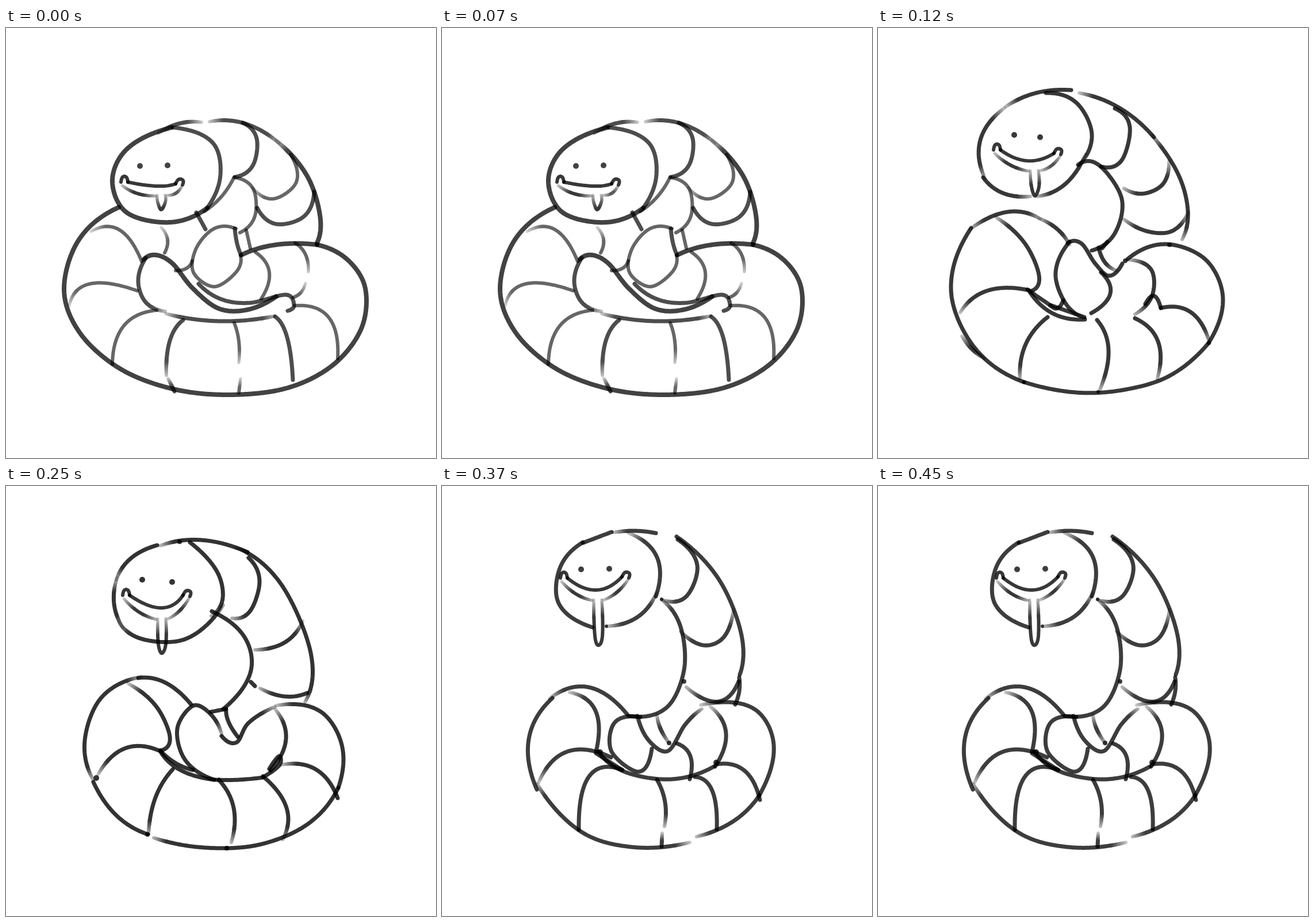
Recreate the animation shown at these times as an HTML page with a canvas. Size 748 px wide and 748 px high, loop 0.5 s.

```html
<!DOCTYPE html>
<html lang="en">
<head>
<meta charset="utf-8">
<title>Coiled worm</title>
<style>
html, body { margin: 0; width: 100%; height: 100%; overflow: hidden; background: #fff; }
canvas { display: block; }
</style>
</head>
<body>
<canvas id="stage" width="748" height="748"></canvas>
<script>
const SIZE = 748;
const LOOP = 500;
const FADE = 26;

function makeLayer() {
  const layer = document.createElement('canvas');
  layer.width = layer.height = SIZE;
  return layer.getContext('2d');
}

function clear(ctx) {
  ctx.globalCompositeOperation = 'source-over';
  ctx.fillStyle = '#fff';
  ctx.fillRect(0, 0, SIZE, SIZE);
}

const brush = makeLayer();
let page, weight, dark;

function nib(w, d) {
  weight = w;
  dark = d;
}

function mix(a, b, c, d, t) {
  return (2 * b + (c - a) * t + (2 * a - 5 * b + 4 * c - d) * t * t +
    (3 * b - a - 3 * c + d) * t * t * t) / 2;
}

// Point that continues the curve before its first point p.
function extend(p, q, r) {
  return [0, 1].map(n => r ? 3 * p[n] - 3 * q[n] + r[n] : 2 * p[n] - q[n]);
}

function spline(pts) {
  const tail = [...pts].reverse();
  const all = [extend(...pts), ...pts, extend(...tail)];
  const out = [];
  for (let i = 1; i < all.length - 2; i++) {
    const [a, b, c, d] = all.slice(i - 1, i + 3);
    const steps = Math.ceil(Math.hypot(c[0] - b[0], c[1] - b[1]) / 3);
    for (let k = 0; k < steps; k++) {
      out.push([0, 1].map(n => mix(a[n], b[n], c[n], d[n], k / steps)));
    }
  }
  out.push(pts[pts.length - 1]);
  return out;
}

// Pale ends and a dark middle; strokes multiply where they cross.
function stroke(fadeStart, fadeEnd, coords) {
  const pts = [];
  for (let i = 0; i < coords.length; i += 2) pts.push([coords[i], coords[i + 1]]);
  const curve = spline(pts);
  const last = curve.length - 1;
  const reach = Math.min(FADE / 3, last * 0.6);
  const ink = i => {
    const a = fadeStart ? Math.min(1, 0.3 + 0.7 * i / reach) : 1;
    const b = fadeEnd ? Math.min(1, 0.3 + 0.7 * (last - i) / reach) : 1;
    return Math.min(a, b);
  };
  clear(brush);
  brush.globalCompositeOperation = 'darken';
  brush.lineCap = brush.lineJoin = 'round';
  for (let i = 0; i < last;) {
    const level = ink(i);
    const grey = Math.round(255 * (1 - dark * level));
    brush.strokeStyle = `rgb(${grey},${grey},${grey})`;
    brush.lineWidth = weight * (0.75 + 0.25 * level);
    brush.beginPath();
    brush.moveTo(...curve[i]);
    do brush.lineTo(...curve[++i]);
    while (i < last && ink(i) === level);
    brush.stroke();
  }
  page.globalCompositeOperation = 'multiply';
  page.drawImage(brush.canvas, 0, 0);
}

const solid = (...xy) => stroke(false, false, xy);
const fadeIn = (...xy) => stroke(true, false, xy);
const fadeOut = (...xy) => stroke(false, true, xy);
const fadeBoth = (...xy) => stroke(true, true, xy);

function dot(r, x, y) {
  const grey = Math.round(255 * (1 - dark));
  page.globalCompositeOperation = 'multiply';
  page.fillStyle = `rgb(${grey},${grey},${grey})`;
  page.beginPath();
  page.arc(x, y, r, 0, Math.PI * 2);
  page.fill();
}

// Eyes, mouth corners, lowest point of the smile, tongue root and tip.
function face({ eyes, left: [lx, ly], right: [rx, ry], dip, root: [x, y], tip: [tx, ty] }) {
  for (const [ex, ey] of eyes) dot(5, ex, ey);
  nib(6, 0.78);
  solid(lx - 3, ly + 9, lx, ly, lx + 6, ly, lx + 9, ly + 9);
  solid(lx + 9, ly + 9, ...dip, rx - 9, ry + 8);
  solid(rx - 9, ry + 8, rx - 3, ry, rx + 4, ry + 2, rx + 3, ry + 10);
  fadeBoth(lx - 1, ly + 15, (lx + x) / 2 - 7, (ly + y) / 2 + 13, x - 9, y + 1);
  fadeBoth(x + 12, y, (x + rx) / 2 + 8, (y + ry) / 2 + 11, rx + 1, ry + 14);
  const side = ty - Math.min(16, (ty - y) / 2);
  fadeBoth(x - 6, y, tx - 6, side, tx, ty, tx + 7, side, x + 8, y);
}

function low() {
  nib(8, 0.74);
  solid(196, 312, 127, 368, 101, 455, 129, 531, 199, 593, 291, 628, 390, 638,
    490, 626, 569, 586, 618, 523, 625, 453, 594, 403, 541, 377);
  solid(541, 377, 470, 377, 409, 395);
  solid(288, 173, 212, 209, 185, 265, 210, 321, 285, 338, 350, 313);
  solid(240, 402, 262, 395, 290, 410, 325, 453, 370, 488, 420, 490, 470, 467);
  fadeIn(470, 196, 523, 256, 546, 325, 541, 374);

  nib(7, 0.7);
  solid(350, 313, 373, 255, 358, 198, 290, 173);
  solid(409, 395, 402, 375, 398, 349);
  fadeBoth(340, 164, 302, 166, 265, 183);
  fadeBoth(354, 163, 415, 166, 475, 200);
  solid(412, 165, 436, 192, 430, 238, 400, 259);
  solid(536, 285, 518, 328, 470, 341, 437, 313);
  solid(331, 321, 347, 350);
  fadeOut(243, 400, 230, 440, 243, 477, 277, 493);
  fadeBoth(278, 497, 372, 510, 468, 501);
  solid(335, 445, 375, 472, 425, 478, 487, 464, 501, 482, 490, 492);
  fadeOut(308, 508, 285, 544, 279, 604);
  fadeIn(282, 610, 293, 632);
  solid(468, 502, 489, 538, 499, 612);

  nib(6, 0.6);
  solid(400, 349, 362, 349, 331, 383, 326, 425, 362, 450, 400, 425, 408, 396);
  solid(345, 319, 375, 293, 397, 259);
  fadeOut(495, 220, 505, 268, 466, 297, 429, 278);
  solid(397, 260, 430, 280, 433, 327, 407, 356);
  solid(418, 352, 425, 383);
  fadeIn(270, 347, 281, 368, 276, 391);
  solid(295, 422, 314, 418, 324, 405);
  fadeIn(148, 354, 197, 351, 236, 406);
  fadeIn(110, 483, 146, 445, 228, 457);
  solid(262, 491, 205, 518, 185, 585);
  fadeOut(397, 513, 405, 545, 405, 582);
  fadeIn(408, 610, 405, 635);
  solid(502, 483, 561, 503, 577, 575);
  fadeOut(503, 374, 521, 394, 526, 424);
  fadeIn(521, 444, 513, 460, 499, 469);
  solid(434, 390, 458, 425, 444, 471);

  nib(6, 0.74);
  face({ eyes: [[233, 240], [281, 239]], left: [203, 259], right: [304, 263],
    dip: [262, 275], root: [269, 291], tip: [270, 316] });
}

function rising() {
  nib(7, 0.78);
  fadeIn(222, 137, 275, 113, 336, 108);
  fadeBoth(220, 139, 178, 195, 186, 262);
  fadeOut(183, 260, 217, 287, 265, 293);
  fadeBoth(275, 293, 325, 272, 361, 220);
  fadeOut(292, 113, 345, 130, 372, 185, 350, 239);
  fadeIn(350, 113, 420, 139, 480, 190);
  fadeBoth(476, 186, 522, 254, 539, 318, 529, 368);
  solid(412, 140, 438, 172, 424, 230, 388, 241);
  fadeBoth(506, 232, 496, 271, 462, 288, 428, 279);
  fadeBoth(540, 320, 512, 353, 470, 354, 428, 333);
  solid(348, 238, 385, 239, 424, 297, 412, 357, 372, 387);
  fadeOut(384, 382, 395, 408, 415, 422);
  solid(399, 372, 390, 383);

  solid(434, 402, 500, 376, 570, 403, 600, 470, 575, 548);
  solid(575, 548, 509, 604, 430, 629, 345, 634, 254, 616);
  solid(254, 616, 168, 556, 127, 455, 162, 348);
  fadeBoth(160, 350, 225, 320, 282, 332);
  fadeBoth(280, 331, 312, 350, 333, 377);
  fadeBoth(146, 536, 163, 558, 185, 575);
  dot(4, 507, 377);
  dot(4, 430, 405);
  dot(3, 254, 616);
  dot(3, 383, 633);

  solid(330, 374, 354, 375, 378, 410, 402, 431, 425, 410);
  fadeOut(333, 372, 309, 425, 325, 477, 358, 504);
  solid(388, 425, 404, 462, 371, 496);
  solid(260, 455, 292, 477, 310, 488, 322, 474);
  solid(264, 459, 305, 497, 360, 507);
  solid(300, 482, 359, 503);

  fadeIn(205, 329, 255, 374, 280, 430, 268, 457);
  fadeIn(143, 495, 190, 457, 262, 456);
  fadeOut(295, 503, 257, 550, 247, 610);
  fadeOut(381, 508, 401, 560, 386, 629);
  fadeOut(447, 505, 487, 545, 486, 610);
  fadeOut(492, 487, 545, 495, 577, 548);
  fadeBoth(434, 403, 475, 420, 477, 465, 447, 498);
  solid(465, 480, 480, 466, 492, 487);

  face({ eyes: [[237, 186], [282, 190]], left: [204, 203], right: [315, 210],
    dip: [260, 231], root: [271, 248], tip: [273, 292] });
}

function tall() {
  nib(7, 0.8);
  fadeOut(263, 103, 217, 126, 192, 163);
  fadeBoth(193, 160, 188, 205, 203, 246);
  fadeBoth(196, 236, 240, 267, 315, 265, 378, 207);
  fadeOut(320, 98, 366, 147, 377, 195, 357, 226);
  fadeIn(268, 104, 340, 94, 420, 115);
  fadeBoth(400, 107, 478, 170, 530, 290, 520, 376);
  dot(4, 302, 97);
  fadeOut(422, 125, 441, 165, 425, 217, 393, 230);
  fadeBoth(516, 235, 485, 272, 433, 285);
  fadeOut(524, 360, 485, 366, 442, 352);
  solid(358, 218, 415, 263, 425, 325, 378, 388);
  solid(426, 341, 433, 348);
  solid(356, 393, 382, 388);
  solid(383, 388, 387, 410, 403, 436);

  fadeIn(470, 382, 545, 391, 584, 450, 578, 525);
  fadeOut(578, 525, 525, 588, 440, 624, 345, 629, 257, 612);
  solid(247, 606, 192, 573, 152, 515);
  fadeBoth(152, 512, 137, 443, 166, 368, 235, 332);
  solid(230, 334, 277, 342, 322, 380);
  dot(5, 157, 508);
  dot(4, 246, 606);
  dot(4, 384, 630);

  fadeIn(376, 434, 357, 398, 326, 382, 298, 422, 312, 477, 362, 511);
  fadeOut(375, 435, 401, 446, 422, 412, 468, 384);
  solid(268, 460, 295, 482, 325, 494);
  solid(270, 464, 305, 495, 362, 511);
  solid(365, 511, 405, 511, 447, 507);

  fadeIn(213, 344, 261, 383, 285, 436, 270, 460);
  fadeIn(160, 502, 208, 456, 270, 462);
  fadeOut(290, 493, 260, 542, 248, 605);
  fadeOut(370, 511, 396, 560, 392, 620);
  fadeOut(447, 505, 488, 560, 481, 615);
  fadeIn(479, 485, 539, 493, 577, 543);
  fadeIn(468, 388, 487, 440, 460, 495);
  solid(458, 492, 475, 470, 476, 485, 448, 506);

  face({ eyes: [[237, 163], [289, 167]], left: [206, 181], right: [317, 182],
    dip: [270, 212], root: [270, 231], tip: [271, 291] });
}

function tallest() {
  nib(7, 0.76);
  solid(245, 99, 295, 80);
  solid(245, 98, 205, 143, 204, 206, 262, 246);
  fadeBoth(287, 244, 340, 228, 373, 186);
  fadeIn(325, 82, 374, 124, 372, 192);
  fadeIn(298, 81, 335, 78, 372, 82);
  solid(408, 88, 480, 160, 520, 255, 518, 328);
  solid(517, 333, 517, 357, 510, 380);
  fadeOut(410, 93, 444, 138, 425, 192, 383, 198);
  fadeBoth(507, 215, 490, 263, 455, 277, 415, 253);
  fadeOut(516, 340, 480, 375, 425, 350);
  fadeIn(382, 198, 415, 245, 421, 320, 390, 386, 325, 400);
  fadeBoth(374, 398, 380, 422, 395, 447);
  dot(3, 382, 197);
  dot(4, 421, 340);

  fadeIn(450, 381, 540, 386, 577, 450, 552, 538);
  fadeOut(552, 538, 507, 583, 443, 610);
  fadeBoth(431, 620, 330, 628, 240, 600, 165, 518);
  solid(165, 528, 151, 440, 192, 369);
  fadeIn(187, 370, 255, 350, 322, 397);

  solid(345, 402, 300, 412, 295, 462, 342, 497, 365, 457);
  fadeOut(340, 400, 360, 443, 393, 461, 423, 415, 452, 388);
  solid(268, 465, 312, 493);
  solid(272, 462, 320, 498, 400, 510, 473, 488);
  dot(5, 275, 463);
  dot(5, 477, 481);
  dot(4, 395, 447);
  dot(3, 286, 244);

  fadeIn(222, 359, 267, 391, 268, 462);
  fadeIn(168, 516, 218, 462, 294, 472);
  solid(314, 494, 256, 505, 238, 598);
  fadeOut(374, 511, 388, 550, 387, 592);
  fadeIn(383, 604, 382, 627);
  solid(440, 506, 470, 530, 478, 597);
  solid(478, 484, 526, 495, 553, 546);
  solid(409, 448, 432, 470, 431, 510);
  fadeIn(467, 384, 494, 430, 475, 488);

  face({ eyes: [[242, 145], [291, 144]], left: [209, 151], right: [322, 150],
    dip: [268, 181], root: [270, 198], tip: [272, 277] });
}

function render(draw) {
  page = makeLayer();
  clear(page);
  draw();
  return page.canvas;
}

const poses = [
  { image: render(low), end: 120 },
  { image: render(rising), end: 250 },
  { image: render(tall), end: 370 },
  { image: render(tallest), end: LOOP }
];

const stage = document.getElementById('stage').getContext('2d');
const start = performance.now();

function show(now) {
  const t = Math.max(0, now - start) % LOOP;
  stage.drawImage(poses.find(p => t < p.end).image, 0, 0);
  requestAnimationFrame(show);
}
show(start);
</script>
</body>
</html>
```
